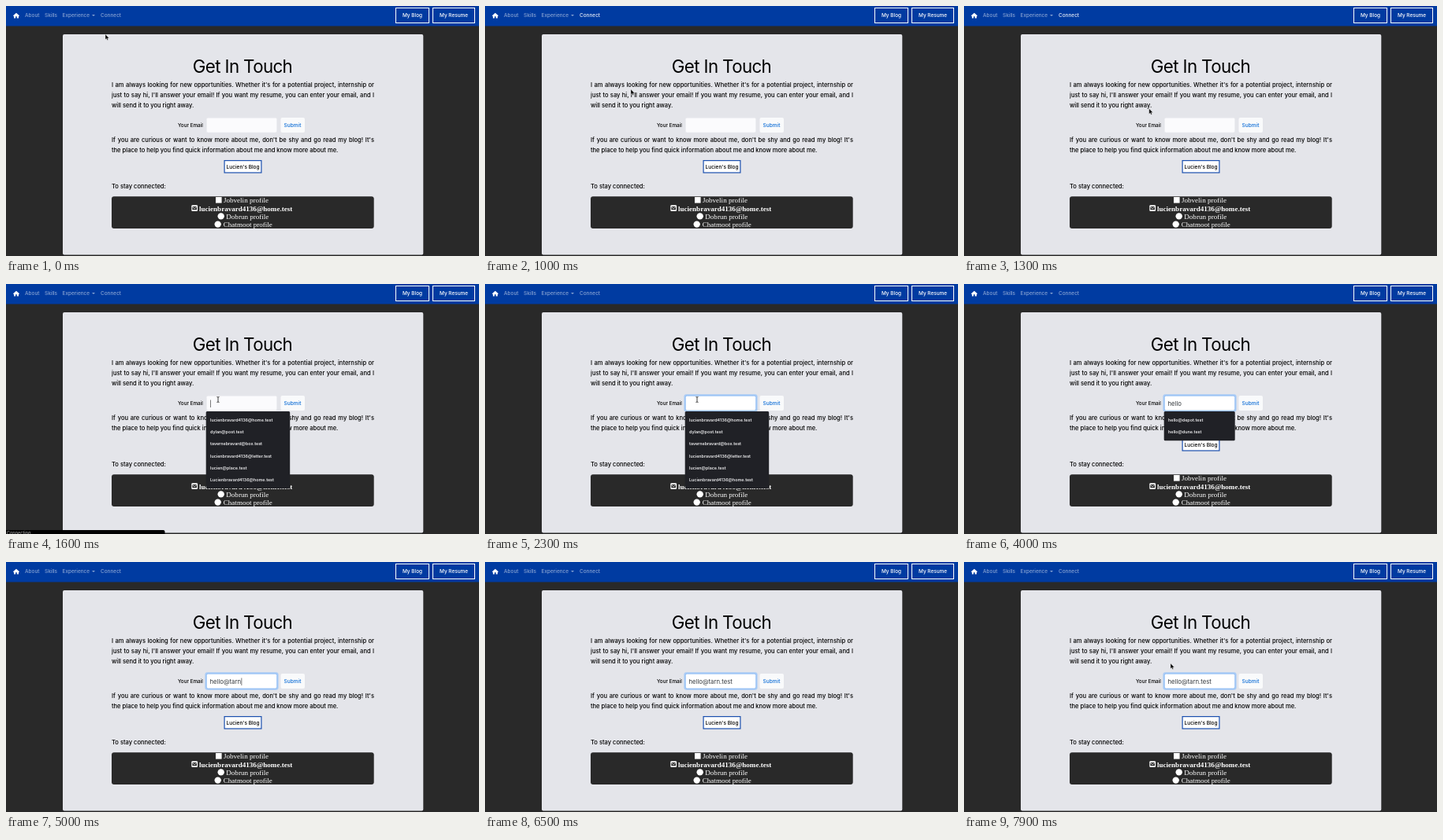
Recreate the animation shown at these times as an HTML page. Size 600x318 px, loop 8000 ms.

```html
<!DOCTYPE html>
<html lang="en">
<head>
<meta charset="utf-8">
<title>Get In Touch</title>
<style>
html, body { margin: 0; width: 100%; height: 100%; overflow: hidden; background: #292929; }
svg { display: block; width: 600px; height: 318px; font-family: Inter, "Open Sans", sans-serif; font-weight: 500; }
.mid { text-anchor: middle; }
.nav { font-size: 6.45px; fill: #fff; }
.link { fill-opacity: .52; }
.body { font-size: 7.55px; }
.body div { line-height: 13px; white-space: nowrap; text-align-last: justify; }
.body div.last { text-align-last: left; }
.serif { font: 9.05px "Liberation Serif", serif; fill: #fff; }
.list { font-size: 5.35px; font-weight: 600; fill: #ececee; }
</style>
</head>
<body>
<svg viewBox="0 0 600 318">
  <rect width="600" height="318" fill="#292929"/>
  <rect width="600" height="25.5" fill="#003ba1"/>
  <path d="M9 12.3 13 8.8 17 12.3 16.4 13 16 12.7V15.4H13.8V13.2H12.2V15.4H10V12.7L9.6 13Z" fill="#fff"/>
  <g class="nav">
    <g class="link">
      <text x="24" y="14.3">About</text>
      <text x="49" y="14.3">Skills</text>
      <text x="71.5" y="14.3">Experience</text>
      <path d="M109 11h4l-2 2z"/>
      <text id="connect" x="120" y="14.3">Connect</text>
    </g>
    <g fill="none" stroke="#fff">
      <rect x="494.5" y="2.5" width="42" height="19"/>
      <rect x="541.5" y="2.5" width="53" height="19"/>
    </g>
    <text class="mid" x="515.5" y="14.3">My Blog</text>
    <text class="mid" x="568" y="14.3">My Resume</text>
  </g>

  <rect x="72" y="36" width="457.3" height="280.6" rx="2" fill="#e4e5ea"/>
  <text class="mid" x="300" y="85.2" font-size="22.3" font-weight="400" letter-spacing="-.62">Get In Touch</text>
  <foreignObject class="body" x="134" y="94" width="333" height="42">
    <div>I am always looking for new opportunities. Whether it's for a potential project, internship or</div>
    <div>just to say hi, I'll answer your email! If you want my resume, you can enter your email, and I</div>
    <div class="last">will send it to you right away.</div>
  </foreignObject>
  <foreignObject class="body" x="134" y="163.5" width="333" height="28">
    <div>If you are curious or want to know more about me, don't be shy and go read my blog! It's</div>
    <div class="last">the place to help you find quick information about me and know more about me.</div>
  </foreignObject>
  <text class="body" x="134" y="232.200">To stay connected:</text>

  <text x="218" y="154" font-size="6.35">Your Email</text>
  <rect x="348.5" y="142" width="30.5" height="19" rx="2" fill="#f9fafb"/>
  <text class="mid" x="363.5" y="154" font-size="6.5" fill="#0a6bd6">Submit</text>
  <rect id="ring" x="252.4" y="140.300" width="93.2" height="22.4" rx="3" fill="#a9cbf5"/>
  <rect id="field" x="254.3" y="142.2" width="89.4" height="18.8" rx="2" stroke-width=".7"/>
  <text id="typed" x="258.5" y="154.500" font-size="7.75" font-weight="400" fill="#33383d"></text>
  <rect id="caret" y="147.5" width=".7" height="9.5" fill="#444"/>

  <rect x="277.1" y="196.6" width="46.8" height="15.4" fill="#fff" stroke="#1a4fae" stroke-width="1.2"/>
  <text class="mid" x="300.6" y="207" font-size="6.55">Lucien's Blog</text>

  <rect x="134" y="242.3" width="332.7" height="40.7" rx="3" fill="#292929"/>
  <g class="serif">
    <rect x="266" y="243" width="7.6" height="7.6"/>
    <text x="276" y="250.4">Jobvelin profile</text>
    <rect x="235.3" y="253.2" width="7.8" height="7.8" rx="1.2"/>
    <path d="M236.4 255h5.6v4.200h-5.6z" fill="#292929"/>
    <path d="M236.4 255.500 239.2 257.6 242 255.500" fill="none" stroke="#fff" stroke-width=".8"/>
    <text x="245" y="260.500" font-weight="bold">lucienbravard4136@home.test</text>
    <circle cx="272.7" cy="267.4" r="4.2"/>
    <text x="279.3" y="270.800">Dobrun profile</text>
    <circle cx="268.7" cy="277.6" r="4.2"/>
    <text x="275.8" y="281">Chatmoot profile</text>
  </g>

  <g id="menu" class="list"></g>
  <g id="status">
    <path d="M0 313H199.500Q201.500 313 201.500 315V318H0Z"/>
    <text id="statusText" x="1" y="319" font-size="5.5" fill="#999">Connecting...</text>
  </g>
  <path id="arrow" d="M0 0V6.600L1.500 5.300 2.500 7.600 3.600 7.100 2.700 4.900H4.700Z" stroke="#ddd" stroke-width=".4"/>
  <path id="beam" d="M-1.500 -3.500Q0 -3.500 0 -2.500Q0 -3.500 1.500 -3.500M0 -2.500V2.500M-1.500 3.500Q0 3.500 0 2.500Q0 3.500 1.500 3.500" fill="none" stroke="#111" stroke-width=".8"/>
</svg>
<script>
const $ = id => document.getElementById(id);
const show = (id, on) => $(id).style.display = on ? '' : 'none';

const address = 'hello@tarn.test';
const keys = [2400, 2600, 2800, 3000, 3200, 4500, 4700, 4800, 4900, 5000, 5300, 5400, 5500, 5600, 5700];
const saved = ['lucienbravard4136@home.test', 'dylan@post.test', 'tavernebravard@box.test',
  'lucienbravard4136@letter.test', 'lucien@place.test', 'Lucienbravard4136@home.test'];
const matches = ['hello@depot.test', 'hello@dune.test'];
const FOCUS = 1500, BLINK = 566;

// Pointer stops: time, x, y
const route = [[0, 126, 36], [100, 126, 36], [400, 133, 13], [700, 136, 16], [1000, 185, 106],
  [1500, 268, 147], [1600, 269, 147], [7600, 269, 147], [7900, 262, 129], [8000, 262, 129]];

function pointerAt(t) {
  const i = route.findIndex(p => p[0] > t);
  const [a, b] = [route[i - 1], route[i]];
  const k = (t - a[0]) / (b[0] - a[0]);
  return [a[1] + (b[1] - a[1]) * k, a[2] + (b[2] - a[2]) * k];
}

function menuMarkup(rows, width) {
  return `<rect x="253.7" y="162" width="${width}" height="${rows.length * 15.2 + 6.8}" rx="1.5" fill="#202126"/>` +
    rows.map((row, i) => `<text x="259" y="${175 + i * 15.2}">${row}</text>`).join('');
}

function draw(t) {
  const count = keys.filter(k => k <= t).length;
  const focused = t >= FOCUS;
  const lastKey = count ? keys[count - 1] : FOCUS;

  $('connect').style.fillOpacity = t >= 300 && !focused ? .9 : .52;
  show('ring', t > 1600);
  $('field').setAttribute('fill', t > 1600 ? '#fff' : '#fbfbfd');
  $('field').setAttribute('stroke', t > 1600 ? '#80b4f4' : '#e9eaee');
  $('typed').textContent = address.slice(0, count);
  const end = count ? $('typed').getComputedTextLength() : 0;
  $('caret').setAttribute('x', 259 + end);
  show('caret', focused && (t - lastKey) % (2 * BLINK) < BLINK);

  const open = focused && count < 7;
  $('menu').innerHTML = !open ? '' : count ? menuMarkup(matches, 90) : menuMarkup(saved, 106.5);
  const loading = t >= 1500 && t < 1800;
  show('status', loading || (t >= 400 && t < 800));
  show('statusText', loading);

  const [x, y] = pointerAt(t);
  const visible = t < keys[0] || t >= 7600;
  const inField = x > 254 && x < 344 && y > 142 && y < 161;
  for (const id of ['arrow', 'beam']) $(id).setAttribute('transform', `translate(${x} ${y})`);
  show('arrow', visible && !inField);
  show('beam', visible && inField);
}

const start = performance.now();
function tick() {
  const t = (performance.now() - start) % 8000;
  draw(Math.floor(t / 100) * 100);
  requestAnimationFrame(tick);
}
tick();
</script>
</body>
</html>
```
